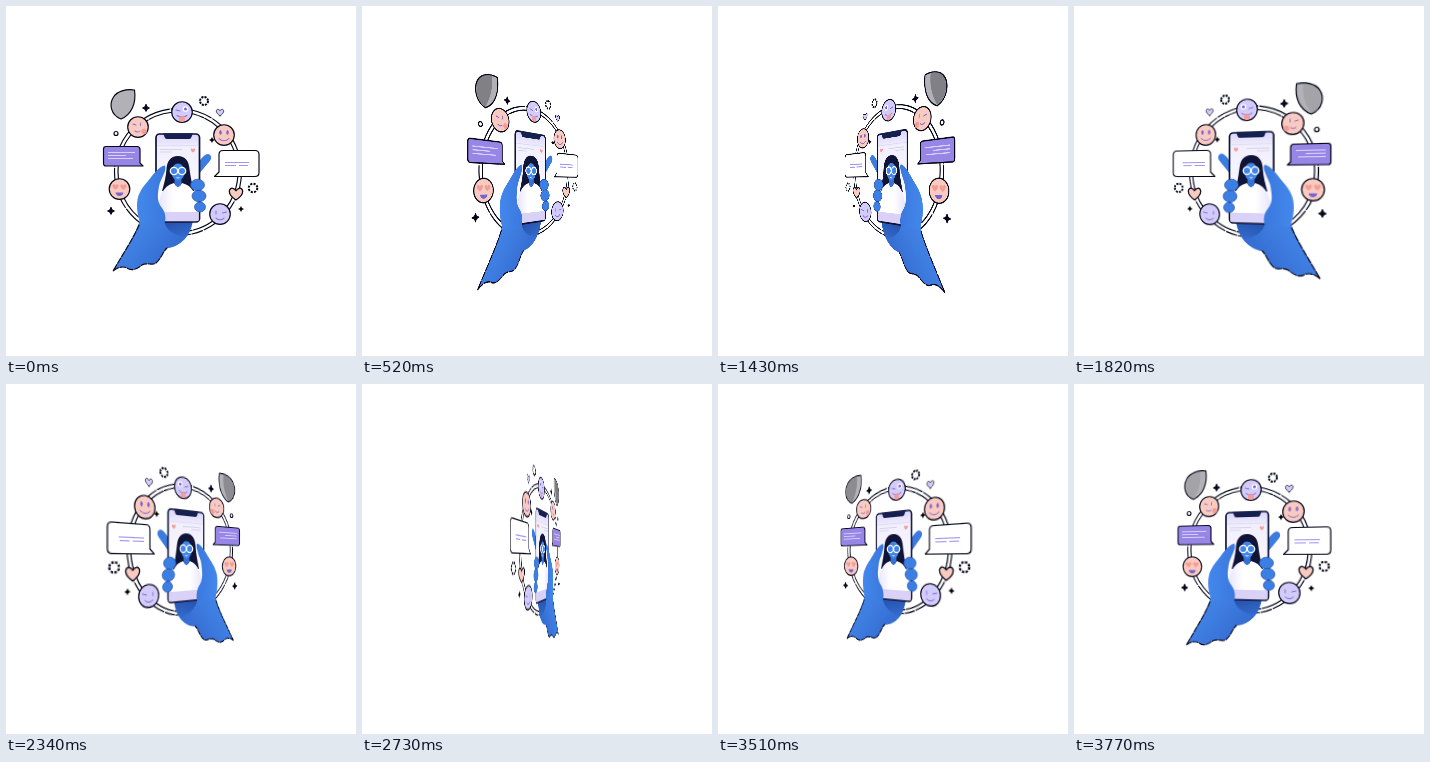
Animation, 350 px wide and 350 px high, one loop 3900 ms. Source, as an HTML page:

```html
<!DOCTYPE html>
<html lang="en">
<head>
<meta charset="utf-8">
<title>Turning social card</title>
<style>
  html, body { margin: 0; width: 100%; height: 100%; overflow: hidden; background: #fff; }
  #stage { position: fixed; inset: 0; overflow: hidden; contain: strict; }
  svg { display: block; width: 350px; height: 350px; transform-origin: 175px 175px; }
  .ink { stroke: #05051a; stroke-width: 1.15; stroke-linejoin: round; stroke-linecap: round; }
  .line { fill: none; }
  .peach { fill: #f9cabf; }
  .lilac { fill: #d3cbf9; }
  .mark { fill: none; stroke: #8673d6; stroke-width: 1; stroke-linecap: round; }
  .eye { fill: #7763d2; }
  .pink { fill: #f49d98; }
</style>
</head>
<body>
<div id="stage">
<svg id="card" viewBox="0 0 350 350">
  <defs>
    <linearGradient id="arm" gradientUnits="userSpaceOnUse" x1="128" y1="215" x2="168" y2="248">
      <stop offset="0" stop-color="#4285e8"/>
      <stop offset=".5" stop-color="#3d7ade"/>
      <stop offset="1" stop-color="#346bcf"/>
    </linearGradient>
    <linearGradient id="palm" gradientUnits="userSpaceOnUse" x1="166" y1="215" x2="172" y2="241">
      <stop offset="0" stop-color="#2552ac"/>
      <stop offset="1" stop-color="#3a76db"/>
    </linearGradient>
    <linearGradient id="thumb" x2="1">
      <stop offset="0" stop-color="#4488ec"/>
      <stop offset="1" stop-color="#3a78de"/>
    </linearGradient>
    <linearGradient id="screen" x2="0" y2="1">
      <stop offset="0" stop-color="#d9d4f9"/>
      <stop offset=".15" stop-color="#f1effd"/>
      <stop offset="1" stop-color="#fff"/>
    </linearGradient>
    <linearGradient id="shirt" x2="1">
      <stop offset="0" stop-color="#e9e5fb"/>
      <stop offset=".4" stop-color="#fff"/>
    </linearGradient>
    <path id="heart" d="M0 5.5C-9 0-6.5-6-3-5.3C-1-5 0-3 0-3S1-5 3-5.3C6.5-6 9 0 0 5.5Z"/>
    <path id="spark" d="M0-4Q.7-.7 4 0Q.7.7 0 4Q-.7.7-4 0Q-.7-.7 0-4Z"/>
    <circle id="head" r="10.300"/>
  </defs>

  <!-- orbit -->
  <g class="ink line" stroke-linecap="butt">
    <circle cx="172" cy="166" r="63.500" stroke-dasharray="29 2 11 1.500"/>
    <circle cx="172" cy="166" r="60" stroke-dasharray="21 1.500 33 2"/>
  </g>

  <!-- leaf -->
  <path fill="#b2b1b6" class="ink" d="M128.500 84C120 82.500 111 85.500 107.500 91C103 98 104.500 109 115 113C125 109 130.500 98 128.500 84Z"/>
  <path id="shade" fill="#7c7b80" d="M122 84C115 84.500 110 87.500 108 91.500C104 98 105.500 108 115 112.300C120 105 124 94 122 84Z"/>

  <!-- small ornaments -->
  <use href="#spark" class="ink" fill="#05051a" transform="translate(140 102) scale(.85)"/>
  <use href="#spark" class="ink" fill="#05051a" transform="translate(105 205) scale(.85)"/>
  <use href="#spark" transform="translate(206 134) scale(.75)"/>
  <use href="#spark" transform="translate(235 203) scale(.75)"/>
  <g class="ink line">
    <circle cx="110" cy="127.500" r="2"/>
    <circle cx="198" cy="95" r="4" style="stroke-width: 2; stroke-linecap: butt" stroke-dasharray="2.100 1.040"/>
    <circle cx="247" cy="182" r="4.300" style="stroke-width: 2; stroke-linecap: butt" stroke-dasharray="2.100 1.277"/>
  </g>
  <use href="#heart" class="ink lilac" transform="translate(214 106.500) scale(.6)"/>
  <use href="#heart" class="ink peach" transform="translate(230 188) scale(1.080)"/>

  <!-- faces -->
  <g transform="translate(132 121)">
    <use href="#head" class="ink peach"/>
    <path class="mark" d="M-5-3l3 1M2.500-4v2.500M-3 4q3 2 5 0"/>
    <circle class="pink" cx="6" cy="4.500" r="2.700"/>
  </g>
  <g transform="translate(176 106)">
    <use href="#head" class="ink lilac"/>
    <path class="mark" d="M-6-2l4 1M-5 3.500q5 3 10 0"/>
    <circle cx="3.500" cy="-3" r="2.800" fill="#fff"/>
    <circle class="eye" cx="3.500" cy="-3" r="1.500"/>
    <path class="pink" d="M-3 4.500h6v2.500a3 3 0 0 1-6 0Z"/>
  </g>
  <g transform="translate(218 129)">
    <use href="#head" class="ink peach"/>
    <ellipse class="eye" cx="-3.500" cy="-2.500" rx="1.200" ry="2.200"/>
    <ellipse class="eye" cx="3.500" cy="-2.500" rx="1.200" ry="2.200"/>
    <path class="mark" d="M-5 3.500q5 4.500 10 0"/>
  </g>
  <g transform="translate(214 208)">
    <use href="#head" class="ink lilac"/>
    <path class="mark" d="M-4-3v3M2.500-1l4-1M-4 4q4 3.500 8 0"/>
  </g>
  <g transform="translate(113.500 183)">
    <use href="#head" class="ink peach"/>
    <use href="#heart" class="pink" transform="translate(-4 -2) scale(.5)"/>
    <use href="#heart" class="pink" transform="translate(4 -2) scale(.5)"/>
    <path class="eye" d="M-4 3.500h8q-1 3.500-4 3.500T-4 3.500Z"/>
  </g>

  <!-- speech bubbles -->
  <path class="ink" fill="#9886e6" d="M100 140.500H131Q134 140.500 134 143.500V157L137 160H100Q97.500 160 97.500 157.500V143Q97.500 140.500 100 140.500Z"/>
  <path d="M102 146.500h27M102 149.500h18M102 152.500h25" stroke="#d9d1fb" stroke-width="1"/>
  <path class="ink" fill="#fff" d="M217 144.500H249Q253 144.500 253 148.500V166.500Q253 170.500 249 170.500H208.500L213 166V148.500Q213 144.500 217 144.500Z"/>
  <path d="M219 156.500h24M219 159.500h11M233 159.500h9" stroke="#a294ee" stroke-width="1.200"/>

  <!-- index finger, palm and arm behind the phone -->
  <path fill="#3c7ce0" d="M190 160C194 154 198 148 202 148C206 149 206 153 203 156L192 169Z"/>
  <path fill="url(#palm)" d="M150 214H187C185 230 174 241 161 242Z"/>
  <path id="wrist" fill="url(#arm)" d="M133 217C128 231 117 248 107 265C112 261 117 260 121 262C126 266 132 262 136 259C141 256 146 260 150 257C155 253 156 247 161 242C168 241 175 237 180 231C168 230 160 224 158 215Z"/>
  <path class="ink line" d="M133 219C128 231 117 248 107 265C112 261 117 260 121 262C126 266 132 262 136 259C141 256 146 260 150 257C155 253 156 247 161 242" stroke-dasharray="6 1.600"/>

  <!-- phone -->
  <rect x="150" y="128" width="43.500" height="88" rx="3.500" fill="url(#screen)" stroke="#0d1236" stroke-width="1.700"/>
  <path fill="#16204f" d="M157 127.300H187L185 132Q184.500 133 183 133H161Q159.500 133 159 132Z"/>
  <path d="M154 143.500h22M154 146h12" stroke="#d6d1e6" stroke-width=".9"/>
  <use href="#heart" class="pink" transform="translate(187 144.500) scale(.36)"/>
  <path d="M151 139.500h41.500" stroke="#dcd8f0" stroke-width=".7"/>
  <rect x="151" y="206" width="41.500" height="9" fill="#d9d1f8"/>

  <!-- portrait -->
  <path fill="#101538" d="M172 150C164 150 161 156 160.500 163C160 171 158 178 156 185H188C186 178 184.500 171 183.500 163C183 155 179 150 172 150Z"/>
  <path fill="url(#shirt)" d="M153 206C152 195 155 183 164 178.500L168 177Q172 184 176 177L180 178.500C188 182 191 191 190 206Z"/>
  <path fill="#3670d2" d="M168.500 171H175.500V178Q172 184 168.500 178Z"/>
  <ellipse cx="172" cy="166" rx="6.600" ry="8.500" fill="#4186ea"/>
  <path fill="#101538" d="M164 164Q166 157 171 155Q178 157 180 164L181 155L172 151L163 155Z"/>
  <g fill="#4186ea" stroke="#fff" stroke-width="1.300">
    <circle cx="168" cy="165" r="3.700"/>
    <circle cx="176" cy="165" r="3.700"/>
  </g>
  <path d="M170.500 171.500q1.500 1 3 0" fill="none" stroke="#fff" stroke-width=".8"/>

  <!-- thumb and fingertips in front -->
  <path fill="url(#thumb)" d="M159 159.500C153 160 147 169 142 175C134 184 131 190 131 200C131 209 134 213 133.500 217.500H158.500C160 214 160 207 156 202C150 195 152 187 153 180C155 172 161 165 159 159.500Z"/>
  <g fill="#3c7fe4" stroke="#1d4498" stroke-width=".6">
    <ellipse cx="191.500" cy="179" rx="7" ry="5.800"/>
    <ellipse cx="193" cy="190" rx="7" ry="5.800"/>
    <ellipse cx="194" cy="201" rx="5.500" ry="5"/>
  </g>
</svg>
</div>
<script>
  const LOOP = 3900, STEP = 130, DEGREES = 12;
  const card = document.getElementById("card");
  const shade = document.getElementById("shade");

  function draw(now) {
    const angle = Math.floor((now % LOOP) / STEP) * DEGREES;
    // The card sits slightly behind its turning axis; the scale restores its front size.
    card.style.transform = `perspective(300px) rotateY(${angle}deg) translateZ(-5px) scale(1.0167)`;
    shade.style.opacity = Math.min(1, 1.2 * Math.abs(Math.sin(angle * Math.PI / 180)));
    requestAnimationFrame(draw);
  }
  draw(0);
</script>
</body>
</html>
```
